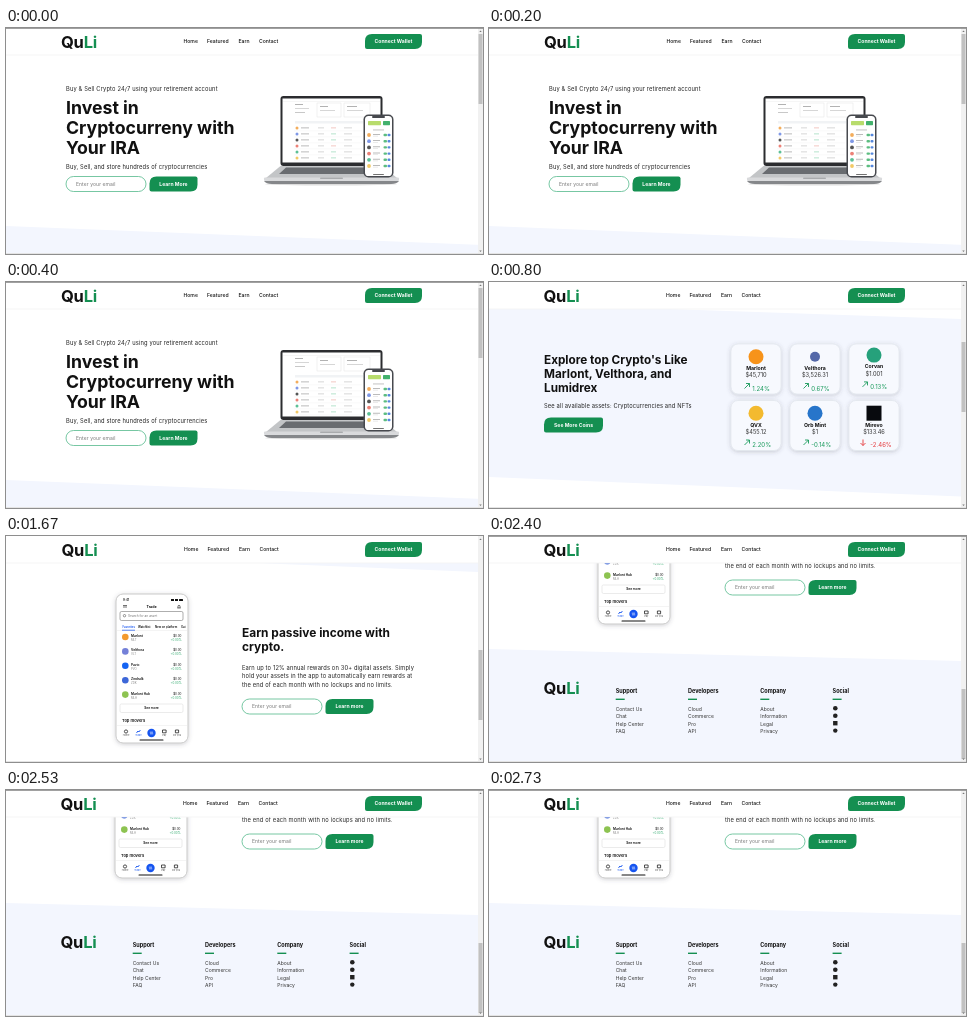
Animation of 477 by 226 pixels, one loop 3.19 s. Source, as an HTML page:

```html
<!DOCTYPE html>
<html lang="en">
<head>
<meta charset="utf-8">
<title>Crypto landing page</title>
<style>
html, body { margin: 0; width: 100%; height: 100%; overflow: hidden; background: #fff; }
svg { position: absolute; left: 0; top: 0; width: 477px; height: 226px; opacity: 0;
  font-family: Inter, "Open Sans", sans-serif; }
</style>
</head>
<body>
<script>
const LOOP = 3190;
const GREEN = '#148f51', PALE = '#f3f6fe', INK = '#111';
const BRAND = ['Qu', 'Li'];
const BODY = { ls: 0.14, c: '#222' };

const rect = (x, y, w, h, fill, more = '') =>
  `<rect x="${x}" y="${y}" width="${w}" height="${h}" fill="${fill}" ${more}/>`;
const dot = (x, y, r, fill) => `<circle cx="${x}" cy="${y}" r="${r}" fill="${fill}"/>`;
const poly = (pts, fill) => `<polygon points="${pts}" fill="${fill}"/>`;
const line = (d, color, w = 0.6) =>
  `<path d="${d}" fill="none" stroke="${color}" stroke-width="${w}"/>`;
const text = (x, y, s, size, o = {}) =>
  `<text x="${x}" y="${y}" font-size="${size}" font-weight="${o.w || 400}" fill="${o.c || INK}"
    text-anchor="${o.a || 'start'}" letter-spacing="${o.ls || 0}">${s}</text>`;
const lines = (x, y, step, rows, size, o) =>
  rows.map((s, i) => text(x, y + i * step, s, size, o)).join('');
const move = (x, y, body) => `<g transform="translate(${x} ${y})">${body}</g>`;

const logo = (x, y) => text(x, y,
  `${BRAND[0]}<tspan fill="${GREEN}">${BRAND[1]}</tspan>`, 16.5, { w: 700, ls: -0.2 });

// Button with two large and two small corners
function button(x, y, w, h, label) {
  const r = 7, s = 2;
  const d = `M${x + r} ${y}H${x + w - s}q${s} 0 ${s} ${s}V${y + h - r}q0 ${r} ${-r} ${r}` +
    `H${x + s}q${-s} 0 ${-s} ${-s}V${y + r}q0 ${-r} ${r} ${-r}z`;
  return `<path d="${d}" fill="${GREEN}"/>` +
    text(x + w / 2, y + h / 2 + 1.8, label, 5.1, { w: 700, c: '#fff', a: 'middle' });
}

const form = (x, y, label) =>
  rect(x, y, 80, 15, '#fff', 'rx="7.5" stroke="#55b98c" stroke-width=".8"') +
  text(x + 10, y + 9.2, 'Enter your email', 5, { c: '#777', ls: 0.08 }) +
  button(x + 83.5, y, 48, 15, label);

function chrome(dx, thumb, edge) {
  const nav = [[177.5, 'Home'], [201, 'Featured'], [232.5, 'Earn'], [253, 'Contact']];
  return rect(0, 0, 472, 27, '#fff') + rect(0, 26.6, 472, 0.8, '#f3f3f3') +
    move(dx, 0, logo(55, 19.8) +
      nav.map(([x, s]) => text(x, 15.3, s, 5.1, { w: 500 })).join('')) +
    button(359, 6, 57, 15, 'Connect Wallet') +
    rect(472, 0, 5, 226, '#f1f1f1') + rect(472.5, thumb, 4, 70, '#c1c1c1') +
    poly('473.3,4 475.7,4 474.5,2.4', '#777') + poly('473.3,222.5 475.7,222.5 474.5,224', '#777') +
    (edge ? rect(0, 0, 477, 0.8, '#8a8a8a') : '') + rect(0, 225, 477, 1, '#e4e4e4');
}

function laptop() {
  const tones = ['#f3ad5c', '#7f98e6', '#555', '#ec8177', '#5cc096', '#f2c967'];
  let s = `<ellipse cx="325" cy="156" rx="66" ry="1.5" fill="#ddd"/>` +
    rect(274.5, 68, 102, 70, '#2b2c2f', 'rx="3"') + rect(276.5, 70.5, 98, 64, '#fff') +
    poly('274.5,138 376.5,138 391,150 260,150', '#c3c5c7') +
    poly('280,139.5 371,139.5 378,146 273,146', '#696c70') +
    rect(258, 149.5, 135, 3.5, '#d9dadc', 'rx="1"') +
    `<path d="M258 153H393Q391 156 385 156H266Q260 156 258 153z" fill="#85878a"/>` +
    rect(314, 149.5, 23, 1.6, '#a9abad', 'rx=".8"');
  s += rect(277, 73.2, 97, 0.4, '#e8e8e8') + rect(289, 76, 8, 0.9, '#aaa') +
    rect(289, 80, 14, 0.8, '#ccc') + rect(289, 84, 10, 0.8, '#bbb') +
    rect(311, 75, 24, 14, '#fff', 'stroke="#e3e3e3" stroke-width=".5"') +
    rect(338, 75, 26, 14, '#fff', 'stroke="#e3e3e3" stroke-width=".5"') +
    rect(314, 78, 8, 0.9, '#aaa') + rect(314, 82, 15, 0.8, '#ccc') +
    rect(341, 78, 10, 0.9, '#aaa') + rect(341, 82, 16, 0.8, '#ccc') +
    rect(289, 93, 68, 2.5, '#f1f3f5');
  for (let i = 0; i < 6; i++) {
    const y = 100 + i * 6;
    s += dot(291, y, 1.5, tones[i]) + rect(295, y - 0.5, 8, 0.8, '#aaa') +
      rect(312, y - 0.5, 6, 0.8, '#ccc') + rect(325, y - 0.5, 5, 0.8, i % 3 ? '#a4dcc0' : '#efb9b4') +
      rect(338, y - 0.5, 8, 0.8, '#ccc') + rect(288, y + 2.8, 68, 0.3, '#eaeaea');
  }
  s += rect(357.5, 86.5, 30, 63, '#47494e', 'rx="5"') + rect(359, 88, 27, 60, '#fff', 'rx="3.6"') +
    rect(366, 88, 13, 2, '#47494e', 'rx="1"') +
    rect(362, 93, 13, 4.2, '#b8dc6c', 'rx=".6"') + rect(377, 93, 7, 4.2, '#43b16d', 'rx=".6"') +
    rect(367, 101.5, 11, 0.9, '#bbb');
  for (let i = 0; i < 6; i++) {
    const y = 107 + i * 6.2;
    s += dot(363, y, 1.9, tones[i]) + rect(367, y - 1, 7, 0.8, '#aaa') + rect(367, y + 0.8, 5, 0.6, '#ddd') +
      rect(377.5, y - 1.2, 3.5, 2.4, '#5cbd80', 'rx="1"') + rect(381.5, y - 1.2, 3, 2.4, '#5688dd', 'rx="1"');
  }
  return s + rect(367, 146, 11, 0.7, '#444', 'rx=".4"');
}

const hero = () =>
  poly('0,198 477,217 477,226 0,226', PALE) +
  text(60, 62.5, 'Buy &amp; Sell Crypto 24/7 using your retirement account', 5.75, BODY) +
  lines(60, 85.6, 20, ['Invest in', 'Cryptocurreny with', 'Your IRA'], 17.7, { w: 700 }) +
  text(60, 141, 'Buy, Sell, and store hundreds of cryptocurrencies', 5.75, BODY) +
  form(60, 148.5, 'Learn More') + laptop();

function card(x, y, [name, price, change, color, r], lift, square) {
  const down = change === '-2.46%', tone = down ? '#e5383b' : '#189a5b';
  const arrow = down ? 'M-11 -6V0M-13.5 -2.5L-11 0L-8.5 -2.5'
    : 'M-11.5 -.5L-6.5 -5.5M-10 -5.5H-6.5V-2';
  return move(x, y,
    rect(0, 0, 50, 50, '#f7f9fe', 'rx="7" stroke="#e1e5ec" stroke-width=".7" filter="url(#soft)"') +
    move(25, -lift,
      (square ? rect(-r, 12.7 - r, 2 * r, 2 * r, color) : dot(0, 12.7, r, color)) +
      text(0, 26, name, 5.2, { w: 700, a: 'middle' }) +
      text(0, 33.4, price, 5.7, { a: 'middle', c: '#333' }) +
      move(0, 45, line(arrow, tone, 0.9)) +
      text(-3.7, 46.8, change, 6, { c: tone })));
}

function coins() {
  const data = [
    ['Marlont', '$45,710', '1.24%', '#f7931a', 7.5],
    ['Velthora', '$3,526.31', '0.67%', '#5468a8', 5],
    ['Corvan', '$1.001', '0.13%', '#26a17b', 7.5],
    ['QVX', '$455.12', '2.20%', '#f3ba2f', 7.5],
    ['Orb Mint', '$1', '-0.14%', '#2775ca', 7.5],
    ['Mirevo', '$133.46', '-2.46%', '#080a0e', 7.5]
  ];
  return poly('0,27 180,27 472,37 472,214.5 0,195', PALE) +
    lines(55, 81.6, 14, ['Explore top Crypto\'s Like', 'Marlont, Velthora, and', 'Lumidrex'], 11.75, { w: 700 }) +
    text(55, 126, 'See all available assets: Cryptocurrencies and NFTs', 5.75, BODY) +
    button(55, 135.5, 59, 15, 'See More Coins') +
    data.map((c, i) => card(242 + i % 3 * 59, i < 3 ? 62 : 118.5, c, i === 2 ? 1.6 : 0, i === 5)).join('');
}

function phone() {
  const rows = [
    ['Marlont', 'MLT', '#f39a2e'], ['Velthora', 'VLT', '#7480d8'], ['Pavio', 'PVO', '#1463f3'],
    ['Zindralk', 'ZDK', '#3d67d8'], ['Marlont Hub', 'MLH', '#8dc351']
  ];
  const gray = '#777', blue = '#1554f0';
  let s = rect(110, 58, 72, 149, '#fff', 'rx="7" stroke="#c9c9c9" stroke-width="1" filter="url(#soft)"') +
    text(117, 65.3, '9:41', 3, { w: 600 }) + rect(165, 63, 3, 2, INK) + rect(169, 63, 3, 2, INK) +
    rect(173, 63, 4, 2, INK, 'rx=".5"') +
    line('M117 69.5h4M117 71h4', INK) + text(145.5, 72.2, 'Trade', 3.6, { w: 700, a: 'middle' }) +
    line('M171.3 72h3.4M172 72v-1.7a1 1 0 0 1 2 0V72', INK) +
    rect(114, 75.5, 63, 9, '#fff', 'rx="1.5" stroke="#777" stroke-width=".6"') +
    `<circle cx="118.5" cy="79.7" r="1.2" fill="none" stroke="#333" stroke-width=".5"/>` +
    text(122, 81.3, 'Search for an asset', 3.2, { c: gray }) +
    text(116.5, 92, 'Favorites', 2.8, { w: 600, c: blue }) + text(132, 92, 'Watchlist', 2.8, { w: 600 }) +
    text(149, 92, 'New on platform', 2.8, { w: 600 }) + text(175, 92, 'Gai', 2.8, { w: 600 }) +
    rect(111, 94, 70, 0.4, '#e3e3e3') + rect(116, 93.8, 13, 0.7, blue);
  rows.forEach(([name, code, color], i) => {
    const y = 101 + i * 14.4;
    s += dot(119.3, y, 3.3, color) + text(125, y, name, 3.2, { w: 600 }) +
      text(125, y + 4, code, 2.8, { c: '#888' }) +
      text(175.5, y, '$0.00', 3, { a: 'end' }) + text(175.5, y + 4, '+0.00%', 2.9, { a: 'end', c: '#26a566' });
  });
  s += rect(114, 168, 63, 8.5, '#fff', 'rx="1.5" stroke="#ddd" stroke-width=".6"') +
    text(145.5, 173.4, 'See more', 3.2, { w: 600, a: 'middle' }) +
    text(116, 186.2, 'Top movers', 4.1, { w: 600 }) + rect(111, 189.5, 70, 0.4, '#e3e3e3') +
    dot(145.5, 197, 4.2, blue) + line('M143.8 196.2h3.2M144 197.8h3.2', '#fff') +
    `<circle cx="120" cy="195.5" r="1.6" fill="none" stroke="#222" stroke-width=".8"/>` +
    line('M130.5 197l1.4 -2 1 1 1.5 -2', blue, 0.9) +
    line('M156.5 194h3.6v2.8h-3.6z', '#222', 0.8) + line('M169.4 194h3.2v2.8h-3.2z', '#222', 0.8);
  [[120, 'Home'], [132.4, 'Trade'], [158.3, 'Pay'], [171, 'For you']].forEach(([x, t], i) =>
    s += text(x, 200.3, t, 2.3, { a: 'middle', c: i === 1 ? blue : '#444' }));
  return s + rect(133.5, 203.5, 24, 1, INK, 'rx=".5"');
}

const passive = dx =>
  move(dx, 0, phone()) +
  lines(236, 100.6, 14, ['Earn passive income with', 'crypto.'], 11.9, { w: 700 }) +
  lines(236, 133.5, 8.7, [
    'Earn up to 12% annual rewards on 30+ digital assets. Simply',
    'hold your assets in the app to automatically earn rewards at',
    'the end of each month with no lockups and no limits.'
  ], 5.75, BODY) +
  form(236, 163, 'Learn more');

const earn = () => poly('250,27 472,27 472,36', PALE) + passive(0);

function footer() {
  const cols = [
    ['Support', 'Contact Us', 'Chat', 'Help Center', 'FAQ'],
    ['Developers', 'Cloud', 'Commerce', 'Pro', 'API'],
    ['Company', 'About', 'Information', 'Legal', 'Privacy'],
    ['Social']
  ];
  return move(0, -119, passive(-1)) + poly('0,113 472,125 472,226 0,226', PALE) + logo(54.5, 158) +
    cols.map(([head, ...items], i) => {
      const x = 126.7 + i * 72.3;
      return text(x, 156.6, head, 5.5, { w: 700 }) + rect(x, 162.6, 9, 1.4, GREEN) +
        lines(x, 174.6, 7.5, items, 5, { c: '#333' });
    }).join('') +
    dot(346.3, 172.2, 2.3, '#222') + dot(346.3, 179.7, 2.3, '#222') +
    rect(344.1, 185, 4.4, 4.4, '#222') + dot(346.3, 194.6, 2.2, '#222');
}

// start, end, header shift, scrollbar thumb, dark top edge, content
const scenes = [
  [0, 800, 0, 6, true, hero],
  [800, 1600, -0.5, 60, false, coins],
  [1600, 2400, 0.5, 114, false, earn],
  [2400, LOOP, -0.5, 153, true, footer]
];
const soft = `<defs><filter id="soft" x="-20%" y="-20%" width="140%" height="140%">
  <feDropShadow dx="0" dy="1" stdDeviation="2" flood-color="#445" flood-opacity=".26"/></filter></defs>`;

document.body.insertAdjacentHTML('beforeend', scenes.map(([, , dx, thumb, edge, draw]) =>
  `<svg viewBox="0 0 477 226">${soft}${rect(0, 0, 477, 226, '#fff')}${draw()}${chrome(dx, thumb, edge)}</svg>`).join(''));

document.querySelectorAll('svg').forEach((el, i) => {
  const [from, to] = scenes[i];
  const key = (t, opacity) => ({ offset: t / LOOP, opacity, easing: 'step-end' });
  const keys = [key(from, 1), key(to, 0)];
  if (from > 0) keys.unshift(key(0, 0));
  if (to < LOOP) keys.push(key(LOOP, 0));
  el.animate(keys, { duration: LOOP, iterations: Infinity });
});
</script>
</body>
</html>
```
